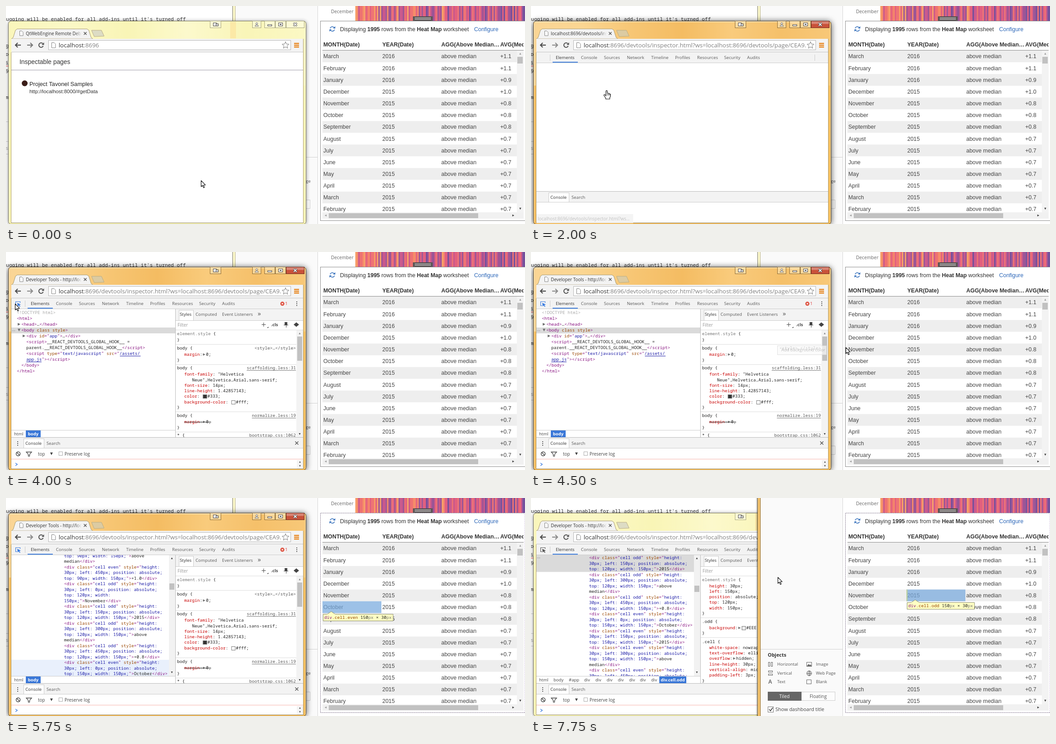
An HTML page with a canvas for the animation above (8000 ms loop, 1153x485 px).

```html
<!DOCTYPE html>
<html>
<head>
<meta charset="utf-8">
<style>
html, body { margin: 0; width: 100%; height: 100%; overflow: hidden; background: #fff; }
canvas { display: block; }
</style>
</head>
<body>
<canvas id="stage" width="1153" height="485"></canvas>
<script>
const c = document.getElementById('stage').getContext('2d');
const LOOP = 8000, STEP = 250;
const UI = '"Open Sans", "Noto Sans", sans-serif';
const ARIAL = '"Liberation Sans", Arial, sans-serif';
const MONO = '"Noto Sans Mono", "DejaVu Sans Mono", monospace';
const CODE = 9.58, LINE = 12.5;

function box(x, y, w, h, fill, stroke) {
  if (fill) { c.fillStyle = fill; c.fillRect(x, y, w, h); }
  if (stroke) { c.strokeStyle = stroke; c.lineWidth = 1; c.strokeRect(x + .5, y + .5, w - 1, h - 1); }
}
const hline = (x, y, w, col) => box(x, y, w, 1, col);
const vline = (x, y, h, col) => box(x, y, 1, h, col);

// y is the middle of the capitals
function text(s, x, y, size, col = '#333', font = UI, weight = '', align = 'left') {
  c.font = `${weight} ${size}px ${font}`;
  c.textAlign = align;
  c.fillStyle = col;
  c.fillText(s, x, Math.round(y + size * .36));
  return x + c.measureText(s).width;
}

function poly(pts, fill, stroke, width = 1, open) {
  c.beginPath();
  pts.forEach(([x, y], i) => i ? c.lineTo(x, y) : c.moveTo(x, y));
  if (!open) c.closePath();
  if (fill) { c.fillStyle = fill; c.fill(); }
  if (stroke) { c.strokeStyle = stroke; c.lineWidth = width; c.stroke(); }
}
function arc(x, y, r, fill, stroke, width = 1, a = 0, b = 7) {
  c.beginPath();
  c.arc(x, y, r, a, b);
  if (fill) { c.fillStyle = fill; c.fill(); }
  if (stroke) { c.strokeStyle = stroke; c.lineWidth = width; c.stroke(); }
}
function tri(x, y, r, dir, col) {
  const [dx, dy] = { u: [0, -1], d: [0, 1], l: [-1, 0], r: [1, 0] }[dir];
  poly([[x + dx * r, y + dy * r], [x - dx * r + dy * r, y - dy * r + dx * r],
    [x - dx * r - dy * r, y - dy * r - dx * r]], col);
}
function clipped(x, y, w, h, draw) {
  c.save();
  c.beginPath();
  c.rect(x, y, w, h);
  c.clip();
  draw();
  c.restore();
}
function cross(x, y, r, col, w = 1.5) {
  poly([[x - r, y - r], [x + r, y + r]], null, col, w, true);
  poly([[x + r, y - r], [x - r, y + r]], null, col, w, true);
}
function gradient(x0, x1, cols) {
  const g = c.createLinearGradient(x0, 0, x1, 0);
  cols.forEach((col, i) => g.addColorStop(i / (cols.length - 1), col));
  return g;
}

// "§x" switches the colour of the code that follows
const INK = { p: '#881280', a: '#994500', v: '#1a1aa6', t: '#222', g: '#aaa', r: '#c80000', d: '#777' };
function code(s, x, y, col = 't') {
  s.split(/§(.)/).forEach((part, i) => {
    if (i % 2) col = part;
    else if (part) x = text(part, x, y, CODE, INK[col], MONO);
  });
  return x;
}

// ---- table data and markup ----
const MONTHS = 'March February January December November October September August July June May April'.split(' ');
const AVG = [1.1, 1.1, .9, 1, .8, .8, .8];
const ROW_H = 26.15, COL_W = 131, TABLE = 99;
const rows = Array.from({ length: 14 }, (_, i) => [
  MONTHS[i % 12], i < 3 ? '2016' : '2015', 'above median', '+' + (AVG[i] || .7).toFixed(1)]);
const parity = r => r % 2 ? 'even' : 'odd';

const lines = [], spans = {};
for (let r = 2; r < 11; r++) rows[r].forEach((value, col) => {
  const first = lines.length;
  lines.push(`§p<div §aclass§p="§vcell ${parity(r)}§p" §astyle§p="§vheight:`);
  lines.push(`§v30px; left: ${col * 150}px; position: absolute;`);
  const tail = `§vtop: ${r * 30}px; width: 150px;§p">§t${value}§p</div>`;
  if (tail.replace(/§./g, '').length > 40) {
    const cut = tail.lastIndexOf(' ');
    const ink = tail.slice(0, cut).match(/§./g).pop();
    lines.push(tail.slice(0, cut), ink + tail.slice(cut + 1));
  } else lines.push(tail);
  spans[r + ',' + col] = [first, lines.length - 1];
});

// inspected cells: time, row, column; each one scrolls the tree only as far as needed
let top0 = 500;
const hovers = [[4750, 4, 0], [5500, 5, 0], [6000, 7, 1], [6250, 6, 1], [6500, 5, 1], [6750, 4, 1]]
  .map(([at, row, col]) => {
    const [first, last] = spans[row + ',' + col];
    top0 = Math.max(Math.min(top0, 391 - LINE * last), 133 - LINE * first);
    return { at, row, col, first, last, top: top0 };
  });

// ---- dashboard window ----
let seed = 11;
const rand = () => (seed = (seed * 16807) % 2147483647) / 2147483647;
const HEAT = ['#f7a067', '#f58a68', '#ee7273', '#e2607f', '#c9588c', '#9c5596', '#75509c'];
const stripes = Array.from({ length: 118 }, (_, i) =>
  HEAT[Math.min(6, Math.floor(rand() * 5.2 + (i > 45 ? 1.5 : .5) * rand() + i / 110))]);

function dashboard(front, hover, inspecting) {
  if (front) box(500, 0, 3, 485, 'rgba(0,0,0,.18)');
  box(503, 0, 7, 485, gradient(503, 510,
    front ? ['#e9b04e', '#fbd184', '#e5a33f'] : ['#f6f1bd', '#fdfad2', '#f1ebad']));
  vline(503, 0, 485, front ? '#5d4a26' : '#77756a');
  vline(509, 0, 485, front ? '#8d6a2c' : '#bdb99c');
  box(510, 0, 182, 485, '#fafafa');
  box(692, 0, 461, 485, '#fff');
  vline(692, 0, 485, '#d4d4d4');
  hline(510, 336, 182, '#cfcfcf');
  objects();
  text('December', 722, 12, 10.3, '#666');
  stripes.forEach((col, i) => box(776 + i * 3.2, 0, 3.7, 33, col));
  box(904, 23, 44, 10, '#5b5555');
  hline(908, 26, 36, '#eee');
  hline(908, 29, 36, '#eee');
  table(hover, inspecting);
}

function objects() {
  text('Objects', 526, 349, 10.9, '#333', UI, 'bold');
  [['Horizontal', 547, 370], ['Image', 633, 370], ['Vertical', 547, 390], ['Web Page', 633, 390],
    ['Text', 547, 409], ['Blank', 633, 409]].forEach(([s, x, y]) => text(s, x, y, 9.5, '#555'));
  const ink = '#666';
  box(527, 365, 4, 10, null, ink); box(533, 365, 4, 10, null, ink);
  box(527, 384, 10, 4, null, ink); box(527, 391, 10, 4, null, ink);
  text('A', 527, 409, 12, ink, ARIAL, 'bold');
  box(612, 365, 12, 10, null, ink);
  poly([[613, 374], [617, 369], [619, 372], [621, 370], [623, 374]], ink);
  arc(618, 390, 5.5, null, ink);
  hline(613, 390, 11, ink); vline(618, 385, 11, ink);
  c.beginPath(); c.ellipse(618, 390, 2.6, 5.5, 0, 0, 7); c.stroke();
  box(612, 404, 11, 10, null, ink);
  box(600, 431, 76, 20, '#fcfcfc', '#ccc');
  box(526, 431, 75, 20, '#666');
  text('Tiled', 563, 441, 10.3, '#fff', UI, '', 'center');
  text('Floating', 638, 441, 10.3, '#555', UI, '', 'center');
  box(526, 464, 13, 13, '#fff', '#777');
  poly([[529, 470], [532, 473.5], [537, 466.5]], null, '#333', 1.5, true);
  text('Show dashboard title', 543, 470, 11, '#444');
}

function table(hover, inspecting) {
  box(698, 33, 460, 445, '#fff', '#8a8a8a');
  if (inspecting) {
    c.setLineDash([2, 2]);
    box(698, 33, 455, 445, null, '#c9b8d8');
    c.setLineDash([]);
  }
  const blue = '#3b74bd';
  arc(725, 51, 5, null, blue, 1.6, 3.4, 5.9);
  arc(725, 51, 5, null, blue, 1.6, .3, 2.8);
  poly([[731.5, 45], [731.5, 50], [726.5, 50]], blue);
  poly([[718.5, 57], [718.5, 52], [723.5, 52]], blue);
  let x = 742;
  [['Displaying '], ['1995', 1], [' rows from the '], ['Heat Map', 1], [' worksheet']].forEach(([s, b]) =>
    x = text(s, x, 52, 12.45, '#333', ARIAL, b ? 'bold' : ''));
  text('Configure', 1040, 52, 12.45, '#2b66b8', ARIAL);

  clipped(700, 76, 450, 24, () => ['MONTH(Date)', 'YEAR(Date)', 'AGG(Above Median…', 'AVG(Median)'].forEach((s, i) =>
    text(s, 705 + i * COL_W, 86, 12.45, '#333', ARIAL, 'bold')));
  hline(703, 98, 447, '#888');
  clipped(700, TABLE, 435, 360, () => rows.forEach((cells, r) => {
    const y = TABLE + r * ROW_H;
    if (r % 2 == 0) box(703, y, 432, ROW_H, '#eee');
    cells.forEach((s, i) => text(s, 705 + i * COL_W, y + 13, 12.45, '#444', ARIAL));
  }));

  box(1135, 99, 15, 360, '#f3f3f3');
  tri(1142.5, 106, 2.2, 'u', '#a0a0a0');
  box(1136, 113, 12, 15, '#c1c1c1');
  tri(1142.5, 451, 2.2, 'd', '#444');
  box(703, 459, 432, 14, '#f1f1f1');
  box(1135, 459, 15, 14, '#f1f1f1');
  tri(710, 466, 2.2, 'l', '#a0a0a0');
  box(717, 461, 332, 11, '#c1c1c1');
  tri(1127, 466, 2.2, 'r', '#444');
  if (hover) inspectMark(hover);
}

function inspectMark({ row, col }) {
  const x = 703 + col * COL_W, y = TABLE + row * ROW_H;
  box(x, y, 131, ROW_H, 'rgba(120,170,222,.72)');
  if (col) box(x, y, 2.5, ROW_H, '#b9cf9f');
  const kind = parity(row), w = 30 + (kind.length + 18) * 5.75, by = Math.round(y + ROW_H) + 2.5;
  c.lineJoin = 'round';
  const l = x + 1.5, r = x + w + .5;
  poly([[l, by], [l + 9, by], [l + 18, by - 6], [l + 27, by], [r, by], [r, by + 15], [l, by + 15]],
    '#ffffc4', '#8c8c70');
  c.lineJoin = 'miter';
  code(`§pdiv§a.cell.${kind}§t 150§dpx§t × 30§dpx`, x + 4, by + 7.5);
}

// ---- page behind, on the left ----
function notes() {
  box(0, 0, 503, 485, '#fff');
  text("ugging will be enabled for all add-ins until it's turned off", 0, 29.5, 11.1, '#333', MONO);
  [['g', 88], ['o', 107], ['i', 126], ['9', 145], ['m', 203], ['s', 316]].forEach(([s, y]) =>
    text(s, -1, y, 11, s == 's' ? '#aaa' : '#333', MONO));
  hline(0, 133, 5, '#d33');
  [257, 301, 329].forEach(y => hline(0, y, 5, '#ccc'));
}

// ---- browser window ----
function browser(t, active) {
  const shape = () => { c.beginPath(); c.roundRect(5.5, 33.5, 661, 452, 6); };
  const glass = gradient(5, 667, active
    ? ['#fad595', '#fbd692', '#f7c674', '#f4bc62', '#f9cb7c', '#f5c06a', '#f8c878']
    : ['#faf6bb', '#fbf8c6', '#f9f5b6', '#fcf9cc', '#f9f5b8', '#fbf8c4']);
  c.save();
  c.shadowColor = active ? 'rgba(0,0,0,.75)' : 'rgba(0,0,0,.5)';
  c.shadowBlur = active ? 14 : 8;
  c.shadowOffsetY = 1;
  shape();
  c.fillStyle = glass;
  c.fill();
  c.restore();
  // the reflection on the frame stops part way down
  box(6, 177, 660, 308, active ? '#f6bd5d' : '#f9f5b6');
  if (active) box(6, 34, 660, 2, 'rgba(255,245,220,.6)');
  vline(6, 40, 445, 'rgba(255,255,240,.6)');
  vline(665, 40, 445, 'rgba(255,255,240,.6)');
  shape();
  c.strokeStyle = active ? '#4a3a20' : '#75725a';
  c.lineWidth = 1;
  c.stroke();
  if (!active) box(498, 35, 13, 37, 'rgba(255,196,110,.28)');
  windowButtons(active);

  poly([[12, 73], [16, 70], [21, 54], [25, 51], [180, 51], [184, 54], [189, 70], [193, 73]], '#f3f3f3', '#a89a70');
  poly([[190, 54], [212, 54], [218, 67], [196, 68]], active ? '#dccba2' : '#dddcc4', '#b9ad85');
  pageIcon(30, 55, 8, 11);
  const title = t < 1750 ? 'QtWebEngine Remote Debugging' : t < 2500 ? 'localhost:8696/devtools/inspector' : 'Developer Tools - http://localhost';
  clipped(44, 52, 123, 20, () => text(title, 44, 61, 9.9, '#333'));
  box(154, 54, 14, 16, gradient(154, 168, ['rgba(243,243,243,0)', '#f3f3f3']));
  cross(176, 61, 3, '#555');

  box(12, 73, 648, 30, '#f3f3f3');
  hline(12, 102, 648, '#c4c4c4');
  navArrow(27, -1, '#4a4a4a');
  navArrow(53, 1, t < 1750 ? '#777' : '#8a8a8a');
  arc(78, 87, 5, null, '#4f4f4f', 2, .4, 5.5);
  poly([[84.5, 81], [84.5, 86.5], [79, 86.5]], '#4f4f4f');
  box(94, 76, 539, 22, '#fff', '#b5b5b5');
  pageIcon(101, 81, 9, 12);
  clipped(112, 77, 500, 20, () => {
    const x = text('localhost', 117, 87, 13.3, '#333');
    text(t < 1750 ? ':8696' : ':8696/devtools/inspector.html?ws=localhost:8696/devtools/page/CEA9.', x, 87, 13.3, '#808080');
  });
  const star = Array.from({ length: 10 }, (_, i) => {
    const r = i % 2 ? 3.6 : 8, a = i * Math.PI / 5;
    return [621 + r * Math.sin(a), 87.5 - r * Math.cos(a)];
  });
  poly(star, '#fff', '#777');
  [82, 86, 90].forEach(y => box(640, y, 11, 2.5, '#e8851c'));

  box(12, 103, 648, 380, '#fff');
  vline(11, 103, 380, '#b0a070');
  vline(660, 73, 410, '#b0a070');
  hline(11, 482, 650, '#8f8460');
  if (t < 1750) pageList(t);
  else devtools(t);
  if (t >= 1500 && t < 2500) {
    const dim = t >= 2000;
    box(12, 463, 215, 20, dim ? 'rgba(243,243,243,.85)' : '#eee');
    text('localhost:8696/devtools/inspector.html?ws...', 15, 473, 9.9, dim ? '#c2c2c2' : '#777');
  }
}

function windowButtons(active) {
  const edge = active ? '#8a6a35' : '#a5a37e', ink = '#444';
  const face = active ? 'rgba(255,240,205,.45)' : 'rgba(255,255,235,.5)';
  [[453, 25], [547, 20], [574, 24], [598, 24]].forEach(([x, w]) => box(x, 33, w, 16, face, edge));
  box(622, 33, 41, 16, active ? '#c9523a' : face, active ? '#6d2a1c' : edge);
  if (active) box(623, 34, 39, 6, 'rgba(255,255,255,.28)');
  box(460, 37, 8, 8, '#fff', ink); box(466, 39, 6, 6, '#ddd', ink);
  arc(557, 39, 2, '#fff', '#666');
  poly([[553, 45], [555, 42], [559, 42], [561, 45]], '#fff', '#666');
  box(581, 41, 10, 4, '#fff', ink);
  box(605, 37, 10, 8, '#fff', ink); box(608, 40, 4, 2, ink);
  cross(642.5, 41, 3.5, ink, 3.5);
  cross(642.5, 41, 3.2, '#fff', 1.8);
}
function pageIcon(x, y, w, h) {
  poly([[x + .5, y + .5], [x + w - 3, y + .5], [x + w, y + 3.5], [x + w, y + h], [x + .5, y + h]], '#fff', '#808080');
}
function navArrow(x, d, col) {
  poly([[x - 6 * d, 87], [x + 5 * d, 87]], null, col, 2.2, true);
  poly([[x + d, 82], [x + 6 * d, 87], [x + d, 92]], null, col, 2.2, true);
}

function pageList(t) {
  text('Inspectable pages', 30, 124, 13.9, '#333', ARIAL);
  hline(12, 142, 648, '#9c98a6');
  if (t >= 1000) box(21, 153, 630, 53, '#f1f1f3');
  arc(41.5, 172, 6.5, '#3a1d18');
  text('Project Tavonel Samples', 52, 173, 12.8, '#222', ARIAL);
  text('http://localhost:8000/#getData', 52, 190, 11.44, '#333', ARIAL);
}

// ---- developer tools ----
function devtools(t) {
  const ready = t >= 2500, full = t >= 2750, picked = t >= 7500;
  box(12, 103, 648, 23, '#f3f3f3');
  hline(12, 126, 648, '#ccc');
  vline(42, 108, 14, '#ccc');
  [['Elements', 55], ['Console', 111], ['Sources', 162], ['Network', 213], ['Timeline', 267], ['Profiles', 320],
    ['Resources', 369], ['Security', 429], ['Audits', 480]].forEach(([s, x], i) => text(s, x, 115, 9.7, i ? '#5a5a5a' : '#333'));
  box(48, 124, 56, 2, '#4583e0');
  hline(12, 412, 648, '#bbb');
  box(12, 413, 648, 23, '#f3f3f3');
  hline(12, 436, 648, '#ccc');
  box(39, 415, 46, 22, '#fff', '#ccc');
  text('Console', 43, 426, 9.7, '#333');
  text('Search', 90, 426, 9.7, '#5a5a5a');
  if (!ready) { vline(630, 108, 14, '#ccc'); return; }

  const ink = t >= 3750 && !picked ? '#3a7ce0' : '#555';
  poly([[25, 119.5], [21.5, 119.5], [21.5, 110.5], [31.5, 110.5], [31.5, 113]], null, ink, 1.2, true);
  poly([[25, 113], [33, 117], [29.5, 118], [32, 121], [30.5, 122], [28, 119], [26, 121]], ink);
  arc(614, 115, 4.5, '#dd4b39');
  cross(614, 115, 1.7, '#fff', 1.2);
  text('1', 620, 115, 9.7, '#d33');
  dots(646, 115);
  if (!full) return;

  dots(26, 426);
  cross(646, 425, 3.5, '#555');
  consoleBar();
  elements(t, picked);
  styles(picked);
}
function dots(x, y) {
  [-4, 0, 4].forEach(d => box(x - 1, y + d - 1, 2, 2, '#555'));
}

function consoleBar() {
  arc(27, 449, 4.5, null, '#444', 1.5);
  poly([[24, 446], [30, 452]], null, '#444', 1.5, true);
  poly([[45, 445], [57, 445], [52.5, 450], [52.5, 454], [49.5, 454], [49.5, 450]], null, '#444', 1.3);
  text('top', 71, 449, 9.9, '#444');
  tri(101, 449, 3, 'd', '#444');
  box(117, 444, 9, 9, '#fff', '#aaa');
  text('Preserve log', 130, 449, 9.9, '#444');
  hline(12, 460, 648, '#f6c6c2');
  box(12, 461, 648, 2, '#fff2f0');
  poly([[21, 469.5], [25, 472.5], [21, 475.5]], null, '#3a7ce0', 1.5, true);
  box(646, 463, 14, 19, '#f4f4f4');
  tri(653, 467, 1.8, 'u', '#444');
  tri(653, 476, 1.8, 'd', '#444');
}

const TREE = [
  [24, '§g<!DOCTYPE html>'], [24, '§p<html>'], [34, '§p<head>§t…§p</head>', 'r'], [34, '§p<body §aclass style§p>', 'd'],
  [45, '§p<div §aid§p="§vapp§p">§t…§p</div>', 'r'], [45, '§p<script>§t__REACT_DEVTOOLS_GLOBAL_HOOK__ ='],
  [45, '§tparent.__REACT_DEVTOOLS_GLOBAL_HOOK__§p<\/script>'],
  [45, '§p<script §atype§p="§vtext/javascript§p" §asrc§p="§v/assets/'], [45, '§vapp.js§p"><\/script>'],
  [34, '§p</body>'], [24, '§p</html>']];

function elements(t, picked) {
  const hover = hovers.filter(h => h.at <= t).pop();
  clipped(12, 127, 364, 269, () => {
    if (hover) {
      const y = hover.top + hover.first * LINE - 6, h = (hover.last - hover.first + 1) * LINE;
      box(12, y, 350, h, picked ? '#dadada' : '#e9f0fc');
      if (picked) text('…', 13, 130, 10, '#777');
      lines.forEach((s, i) => {
        const ly = hover.top + i * LINE;
        if (ly > 115 && ly < 405) code(s, 129, ly);
      });
      box(362, 127, 14, 269, '#f2f2f2');
      tri(368.5, 134, 2, 'u', '#444');
      box(363, 190 - (hover.top + 134) * 5 / 108, 11, 14, '#c1c1c1');
      tri(368.5, 388, 2, 'd', '#444');
    } else {
      box(12, 168, 364, 13, '#dadada');
      text('…', 13, 172, 10, '#777');
      TREE.forEach(([x, s, fold], i) => {
        const y = 135 + i * 12.93;
        if (fold) tri(x - 5, y, 3, fold, '#6e6e6e');
        code(s, x, y);
      });
      hline(253, 231, 46, INK.v);
      hline(45, 244, 34, INK.v);
    }
  });
  vline(376, 127, 285, '#bbb');
  hline(12, 396, 364, '#ccc');
  const crumb = picked ? [['html', 18], ['body', 50], ['#app', 84],
    ...[118, 143, 168, 193, 218, 242, 267].map(x => ['div', x])] : [['html', 18]];
  crumb.forEach(([s, x]) => text(s, x, 405, 9.5, '#444'));
  const [x, w, s] = picked ? [285, 60, 'div.cell.odd'] : [44, 33, 'body'];
  box(x, 397, w, 15, '#3b78d8');
  text(s, x + w / 2, 405, 9.5, '#fff', UI, 'bold', 'center');
}

// rule: [y, selector, link, declarations as [y, name, value, fold, swatch, struck], y of the closing brace]
const BODY_RULES = [
  [182, '§delement.style §t{', '', [], 196],
  [214, 'body {', '<style>…</style>', [[228, 'margin', '0;', 1]], 241],
  [258, 'body {', 'scaffolding.less:31', [[272, 'font-family', ' "Helvetica'], [285, '', '   Neue",Helvetica,Arial,sans-serif;'],
    [297, 'font-size', ' 14px;'], [309, 'line-height', ' 1.42857143;'], [321, 'color', '#333;', 0, '#333'],
    [334, 'background-color', '#fff;', 0, '#fff']], 346],
  [364, 'body {', 'normalize.less:19', [[378, 'margin', '0;', 1, '', 1]], 391],
  [408, '* {', 'bootstrap.css:1062', [], 430]];
const CELL_RULES = [
  [182, '§delement.style §t{', '', [[196, 'height', ' 30px;'], [208, 'left', ' 150px;'], [220, 'position', ' absolute;'],
    [232, 'top', ' 120px;'], [245, 'width', ' 150px;']], 257],
  [275, '.odd {', '', [[289, 'background', '#EEE;', 1, '#eee']], 301],
  [320, '.cell {', '', [[333, 'white-space', ' nowrap;'], [345, 'text-overflow', ' ellipsis;'], [357, 'overflow', 'hidden;', 1],
    [370, 'line-height', ' 30px;'], [382, 'vertical-align', ' middle;'], [394, 'padding-left', ' 3px;']], 407]];

function styles(picked) {
  box(377, 127, 283, 25, '#f3f3f3');
  hline(377, 152, 283, '#ccc');
  box(384, 129, 33, 24, '#fff', '#ccc');
  text('Styles', 386, 139, 9.7, '#333');
  text('Computed', 421, 139, 9.7, '#5a5a5a');
  text('Event Listeners', 480, 139, 9.7, '#5a5a5a');
  text('»', 559, 137, 15, '#555');
  text('Filter', 381, 162, 9.9, '#999');
  hline(568, 161, 9, '#444'); vline(572, 157, 9, '#444');
  poly([[583, 166], [583, 169], [580, 169]], '#444');
  text('.cls', 589, 162, 9.6, '#444', UI, 'bold');
  box(619, 156, 6, 6, '#444'); hline(617, 162, 10, '#444'); vline(622, 162, 6, '#444');
  poly([[639, 161.5], [645, 156.5], [651, 161.5], [645, 166.5]], '#444');
  hline(377, 173, 283, '#ddd');

  clipped(377, 174, 283, 238, () => {
    (picked ? CELL_RULES : BODY_RULES).forEach(([y, sel, link, decls, end]) => {
      code(sel, 380, y);
      if (link) {
        text(link, 644, y, CODE, '#555', MONO, '', 'right');
        if (link[0] != '<') hline(644 - link.length * 5.75, y + 5, link.length * 5.75, '#777');
      }
      decls.forEach(d => declaration(...d));
      code('}', 380, end);
      hline(377, end + 9, 268, '#ddd');
    });
    box(645, 174, 15, 238, '#f3f3f3');
    tri(652.5, 181, 2, 'u', '#888');
    box(647, 188, 11, 54, '#c1c1c1');
    tri(652.5, 405, 2, 'd', '#444');
  });
}
function declaration(y, name, value, fold, swatch, struck) {
  let x = name ? code(`§r${name}§t:`, 396, y) : 396;
  if (fold) { tri(x + 4, y, 2.8, 'r', '#777'); x += 8; }
  if (swatch) {
    if (!fold) x += 6;
    box(x + 1, y - 4, 9, 9, swatch, '#777');
    x += 11;
  }
  x = code(value, x, y);
  if (struck) hline(396, y, x - 396, '#333');
}

// ---- pointer ----
const PATH = [[0, 433, 388], [1250, 168, 188], [2500, 168, 188], [3750, 20, 115], [4000, 20, 115], [4250, 540, 196],
  [4500, 699, 212], [5000, 775, 222], [6000, 880, 297], [6500, 898, 245], [6750, 902, 223], [7250, 902, 223], [7750, 548, 176]];

function pointer(t) {
  if (t >= 5000 && t < 6000) return;
  const i = PATH.findIndex(p => p[0] > t);
  const a = i < 0 ? PATH[PATH.length - 1] : PATH[i - 1], b = i < 0 ? a : PATH[i];
  const k = a == b ? 0 : (t - a[0]) / (b[0] - a[0]), s = k * k * (3 - 2 * k);
  c.save();
  c.translate(a[1] + (b[1] - a[1]) * s, a[2] + (b[2] - a[2]) * s);
  c.lineJoin = 'round';
  if (t >= 1000 && t < 2750) {
    poly([[-1.5, 1], [0, 0], [1.5, 1], [1.5, 6], [4, 6], [6.5, 7], [8.5, 8.5], [8.5, 13], [7, 16], [7, 19], [-2, 19],
      [-2, 17], [-6, 11], [-5.5, 9], [-3.5, 9.5], [-1.5, 12]], '#fff', '#111', 1.2);
    [1.5, 4, 6.5].forEach(x => vline(x, 7, 4, '#333'));
  } else if (t >= 6000 && t < 7500) {
    box(-.5, -6, 1, 12, '#f4f6f8');
    box(-3, -6, 6, 1, '#f4f6f8');
    box(-3, 5, 6, 1, '#f4f6f8');
  } else {
    poly([[.5, .5], [.5, 14], [3.5, 11.2], [6, 16.5], [8, 15.5], [5.7, 10.5], [10, 10.2]], '#fff', '#111', 1.2);
  }
  c.restore();
}

function draw(t) {
  const front = t >= 7500, active = t >= 1500 && !front;
  const hover = hovers.filter(h => h.at <= t).pop();
  const back = () => dashboard(front, hover, t >= 4750);
  notes();
  if (!front) back();
  browser(t, active);
  if (front) back();
  if (t == 4500) {
    box(547, 208, 110, 21, 'rgba(250,250,250,.7)', 'rgba(190,190,190,.45)');
    text('Add background color', 556, 218, 9.5, 'rgba(120,120,120,.45)');
  }
  pointer(t);
}

let start, shown = -1;
function frame(now) {
  start ??= now;
  const t = Math.floor((now - start) % LOOP / STEP) * STEP;
  if (t != shown) draw(shown = t);
  requestAnimationFrame(frame);
}
draw(0);
requestAnimationFrame(frame);
</script>
</body>
</html>
```
